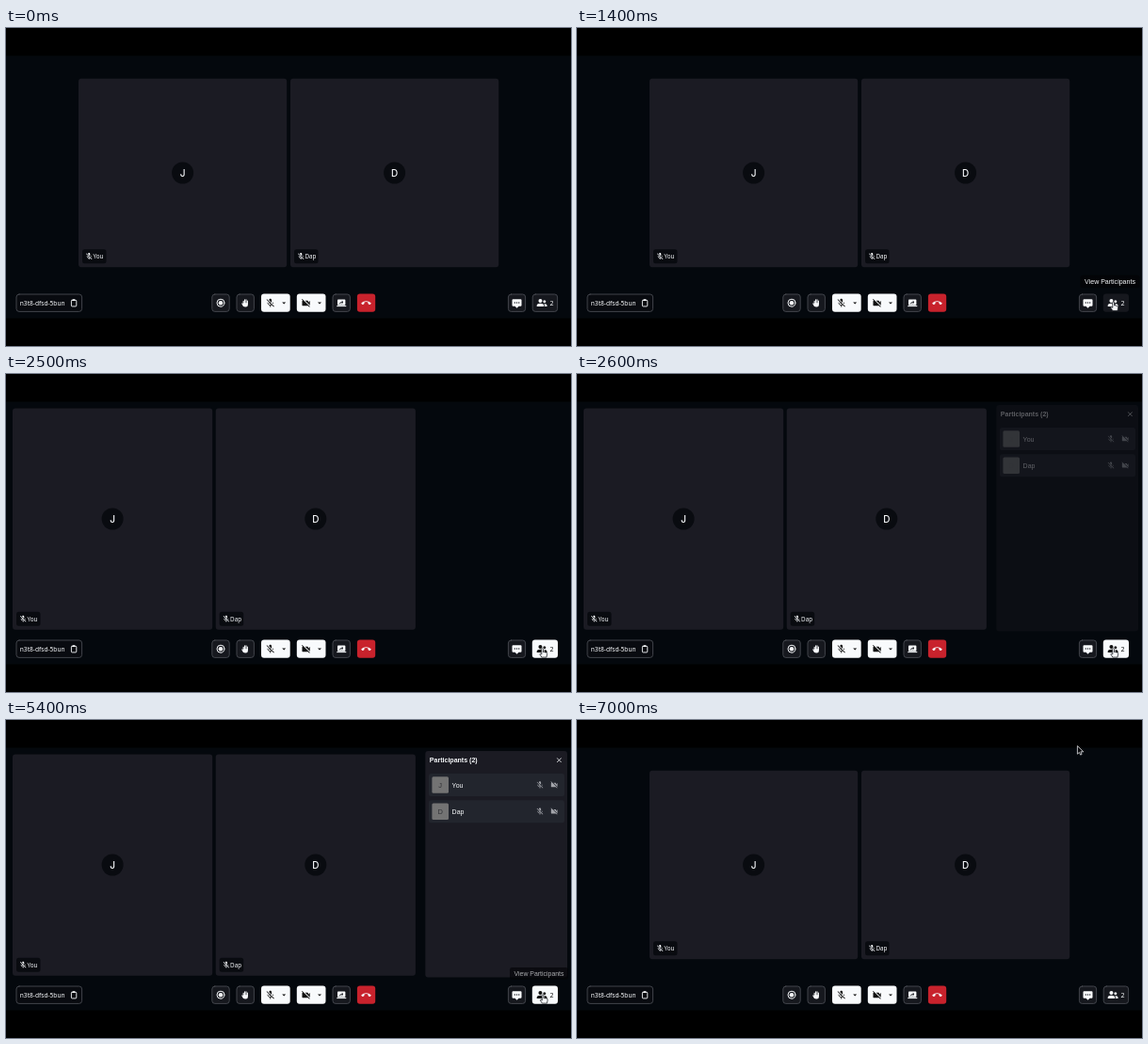
Animation of 600x338 px, one loop 8300 ms. Source, as an HTML page with a canvas:

```html
<!DOCTYPE html>
<html lang="en">
<head>
<meta charset="utf-8">
<title>Video call</title>
<style>
  html, body { margin: 0; width: 100%; height: 100%; overflow: hidden; background: #000; }
  canvas { display: block; width: 600px; height: 338px; }
</style>
</head>
<body>
<canvas id="stage"></canvas>
<script>
const W = 600, H = 338, LOOP = 8300, STEP = 100;
const UI = '"Noto Sans", "Open Sans", sans-serif';
const ROUND = 'Inter, "Open Sans", sans-serif';
const ARIAL = '"Liberation Sans", Arial, sans-serif';
const WHITE = '#f8fafc', STAGE = '#04080d', TILE = '#1b1b23', DARK = '#090b10';
const BUTTON = '#16181e', BORDER = '#484b52', INK = '#111';
const GUEST = 'Dap', ROOM = 'n3t8-dfsd-5bun';

const canvas = document.getElementById('stage');
const ratio = window.devicePixelRatio || 1;
canvas.width = Math.round(W * ratio);
canvas.height = Math.round(H * ratio);
const ctx = canvas.getContext('2d');

const clamp = v => Math.max(0, Math.min(1, v));
const ramp = (t, from, to) => clamp((t - from) / (to - from));
const ease = p => p * p * (3 - 2 * p);
const mix = (a, b, p) => a + (b - a) * p;

// Icon outlines on a 24 unit grid
const MIC_OFF = new Path2D('M19 11h-1.7c0 .74-.16 1.43-.43 2.05l1.23 1.23c.56-.98.9-2.09.9-3.28zM15 11.17V5c0-1.66-1.34-3-3-3S9 3.34 9 5v.18zM4.27 3L3 4.27l6 6V11c0 1.66 1.33 3 3 3l.65-.08 1.66 1.66c-.71.33-1.5.52-2.31.52-2.76 0-5.3-2.1-5.3-5.1H5c0 3.41 2.72 6.23 6 6.72V21h2v-3.28c.91-.13 1.77-.45 2.54-.9L19.73 21 21 19.73z');
const CAM_OFF = new Path2D('M21 6.5l-4 4V7q0-1-1-1H9.82L21 17.18zM3.27 2L2 3.27 4.73 6H4q-1 0-1 1v10q0 1 1 1h12l.54-.18L19.73 21 21 19.73z');
const PEOPLE = new Path2D('M13 7.500a4.200 4.200 0 1 1-8.400 0a4.200 4.200 0 1 1 8.400 0zM21 9a3.100 3.100 0 1 1-6.200 0a3.100 3.100 0 1 1 6.200 0zM1 20v-2.500Q1.500 13 8.800 13T16.500 17.500V20zM18 20h5.500v-2.500Q23 13.500 17 13.500Q18 15 18 17z');
const PHONE = new Path2D('M12 9q-2.400 0-4.600.72v3.100q0 .6-.56.9l-2.700 1.850q-.7.5-1.400 0L.3 13.100q-.6-.7 0-1.400C6.500 5.500 17.500 5.500 23.700 11.700q.6.700 0 1.400l-2.500 2.500q-.7.500-1.400 0l-2.700-1.850q-.5-.3-.5-.9v-3.100Q14.400 9 12 9z');
const BUBBLE = new Path2D('M4 3h16q2 0 2 2v11q0 2-2 2h-4l-4 4-4-4H4q-2 0-2-2V5q0-2 2-2z');
const ARROW = new Path2D('M0 0V8.300L2 6.500L3.300 9.200L4.700 8.500L3.500 5.900H6z');
const HAND = new Path2D('M-.9 .8Q0-.7.900.800V4Q2 3.200 2.600 4.300Q3.700 3.600 4.100 4.700Q5.300 4.500 5.200 5.900L4.500 9.500H-.6L-2.700 6.300Q-2.600 4.900-.9 6z');

function box(x, y, w, h, radius, fill, stroke) {
  ctx.beginPath();
  ctx.roundRect(x, y, w, h, radius);
  if (fill) { ctx.fillStyle = fill; ctx.fill(); }
  if (stroke) { ctx.strokeStyle = stroke; ctx.lineWidth = 0.9; ctx.stroke(); }
}

function disc(x, y, r, color) {
  ctx.fillStyle = color;
  ctx.beginPath();
  ctx.arc(x, y, r, 0, Math.PI * 2);
  ctx.fill();
}

function line(points, color, width) {
  ctx.beginPath();
  points.forEach(([x, y]) => ctx.lineTo(x, y));
  ctx.strokeStyle = color;
  ctx.lineWidth = width;
  ctx.lineCap = 'round';
  ctx.stroke();
}

function text(value, x, y, font, color, align = 'left') {
  ctx.font = font;
  ctx.fillStyle = color;
  ctx.textAlign = align;
  ctx.fillText(value, x, y);
}

function icon(path, cx, cy, size, color) {
  ctx.save();
  ctx.translate(cx - size / 2, cy - size / 2);
  ctx.scale(size / 24, size / 24);
  ctx.fillStyle = color;
  ctx.fill(path);
  ctx.restore();
}

function tile(x, y, w, h, name, initial) {
  box(x, y, w, h, 3, TILE);
  const cx = x + w / 2;
  disc(cx, 154, 11.5, DARK);
  text(initial, cx, 157.6, `500 10px ${ROUND}`, WHITE, 'center');
  const top = y + h - 19;
  box(x + 4, top, 25.5, 15, 2.5, DARK);
  icon(MIC_OFF, x + 11.2, top + 7.5, 8.6, WHITE);
  text(name, x + 15.4, top + 9.9, `500 6.3px ${UI}`, WHITE);
}

function button(x, w) {
  box(x + 0.4, 283, w - 0.8, 18.4, 3, BUTTON, BORDER);
}

function solidButton(x, w, fill) {
  box(x, 282.6, w, 19.2, 3, fill);
}

function caret(x) {
  ctx.fillStyle = INK;
  ctx.beginPath();
  ctx.moveTo(x - 2, 291.4);
  ctx.lineTo(x + 2, 291.4);
  ctx.lineTo(x, 293.5);
  ctx.fill();
}

function raisedHand(x, y) {
  [[-2, -1.8], [-0.6, -3.3], [0.8, -3.3], [2.2, -2.2]].forEach(([dx, dy]) =>
    line([[x + dx, y + dy], [x + dx, y + 1]], WHITE, 1.1));
  box(x - 2.6, y, 5.3, 4.4, [0, 0, 2.5, 2.5], WHITE);
  line([[x - 3.4, y + 0.8], [x - 1.8, y + 3.2]], WHITE, 1.1);
}

function toolbar(open, highlight) {
  box(11, 283, 69.6, 18.4, 3, DARK, BORDER);
  text(ROOM, 14.8, 294.8, `500 6.6px ${UI}`, WHITE);
  box(69.4, 289.3, 5.4, 6.6, 0.8, null, WHITE);
  box(70.8, 288.3, 2.6, 1.8, 0.5, WHITE);

  button(218.4, 19.2);
  ctx.beginPath();
  ctx.arc(228, 292.2, 4, 0, Math.PI * 2);
  ctx.strokeStyle = WHITE;
  ctx.lineWidth = 1;
  ctx.stroke();
  disc(228, 292.2, 2.3, WHITE);

  button(244.6, 19.2);
  raisedHand(254.2, 292.2);

  solidButton(271, 30.7, WHITE);
  icon(MIC_OFF, 280.7, 292.3, 11, INK);
  caret(295.2);
  solidButton(308.8, 30.7, WHITE);
  icon(CAM_OFF, 318.6, 292.5, 11, INK);
  caret(333);

  button(346.6, 19.2);
  box(352, 288.6, 8.4, 6.2, 0.8, WHITE);
  line([[351.5, 295.6], [360.9, 295.6]], WHITE, 1);
  line([[354.6, 293], [355.2, 291.8], [357.4, 291.5]], BUTTON, 0.9);
  line([[356.8, 290.4], [358, 291.5], [356.8, 292.6]], BUTTON, 0.9);

  solidButton(372.9, 19.3, '#c8222c');
  icon(PHONE, 382.5, 292.4, 10.4, WHITE);

  button(533, 19);
  icon(BUBBLE, 542.5, 292.8, 12, WHITE);
  [-2.2, 0, 2.2].forEach(dx => disc(542.5 + dx, 292, 0.7, BUTTON));

  if (open) solidButton(558.8, 27.2, WHITE);
  else if (highlight) solidButton(558.8, 27.2, BUTTON);
  else button(558.8, 27.2);
  const ink = open ? INK : WHITE;
  icon(PEOPLE, 569, 292.2, 11.6, ink);
  text('2', 577.5, 294.8, `500 7px ${UI}`, ink);
}

function panelRow(y, name, initial) {
  box(449, y, 144, 24, 2.5, '#22252d');
  box(452.4, y + 3.2, 17.6, 17.6, 1.5, '#737373');
  text(initial, 461.2, y + 14.6, `7.5px ${ARIAL}`, '#333438', 'center');
  text(name, 473.6, y + 14.7, `7px ${ARIAL}`, WHITE);
  icon(MIC_OFF, 567, y + 12, 9, '#a3a5ab');
  icon(CAM_OFF, 582.2, y + 12, 9, '#a3a5ab');
}

function panel(alpha) {
  if (!alpha) return;
  ctx.globalAlpha = alpha;
  box(445.3, 33, 150.7, 240.4, 3, TILE);
  text('Participants (2)', 449.8, 45.1, `bold 7.05px ${ARIAL}`, WHITE);
  line([[585.4, 40.7], [589.4, 44.7]], WHITE, 0.8);
  line([[589.4, 40.7], [585.4, 44.7]], WHITE, 0.8);
  panelRow(57, 'You', 'J');
  panelRow(85.2, GUEST, 'D');
  ctx.globalAlpha = 1;
}

function tooltip(alpha) {
  if (!alpha) return;
  const scale = mix(0.95, 1, alpha);
  ctx.save();
  ctx.globalAlpha = alpha;
  ctx.translate(566, 269.5);
  ctx.scale(scale, scale);
  box(-31.5, -6.7, 63, 13.4, 2.5, '#030407');
  text('View Participants', 0, 2.3, `7.04px ${ARIAL}`, WHITE, 'center');
  ctx.restore();
}

function tooltipAlpha(t) {
  if (t < 2300) return ramp(t, 600, 900);
  if (t < 5300) return 1 - ramp(t, 2200, 2400);
  return t < 5500 ? ramp(t, 5200, 5500) : 0;
}

// Tip of the pointer
function pointer(t) {
  if (t < 500) return null;
  if (t < 1400) {
    const p = ease(ramp(t, 500, 1300));
    return [mix(575, 569.5, p), mix(287, 290.5, p)];
  }
  if (t < 2300) return [569.5, 291];
  if (t < 6300) return [t < 4400 ? 569.5 : 570, 291.6];
  if (t < 7000) {
    const p = ease(ramp(t, 6200, 6800));
    return [mix(570, 531.5, p), mix(291.6, 42.2, p)];
  }
  return [531.4, 27.9];
}

function drawPointer([x, y]) {
  const overButton = y > 283;
  const shape = overButton ? HAND : ARROW;
  ctx.save();
  ctx.translate(x, y);
  ctx.lineJoin = 'round';
  ctx.lineWidth = 0.8;
  ctx.fillStyle = overButton ? WHITE : '#08090c';
  ctx.strokeStyle = overButton ? '#24262b' : '#e4e5e8';
  ctx.fill(shape);
  ctx.stroke(shape);
  ctx.restore();
}

function draw(t) {
  const open = t >= 2400 && t < 5500;
  const highlight = t >= 500 && t < 2400;
  const tip = pointer(t);

  ctx.setTransform(ratio, 0, 0, ratio, 0, 0);
  ctx.fillStyle = '#000';
  ctx.fillRect(0, 0, W, H);
  ctx.fillStyle = STAGE;
  ctx.fillRect(0, 29.5, W, 279);

  const [left, second, top, width, height] = open
    ? [7, 222.7, 36.4, 212.2, 235.4]
    : [77, 302, 53.8, 221.2, 200.4];
  tile(left, top, width, height, 'You', 'J');
  tile(second, top, width, height, GUEST, 'D');
  if (open) panel(ramp(t, 2500, 2800));
  toolbar(open, highlight);
  tooltip(tooltipAlpha(t));
  if (tip) drawPointer(tip);
}

const start = performance.now();
function tick() {
  const t = (performance.now() - start) % LOOP;
  draw(Math.floor(t / STEP) * STEP);
  requestAnimationFrame(tick);
}
tick();
</script>
</body>
</html>
```
